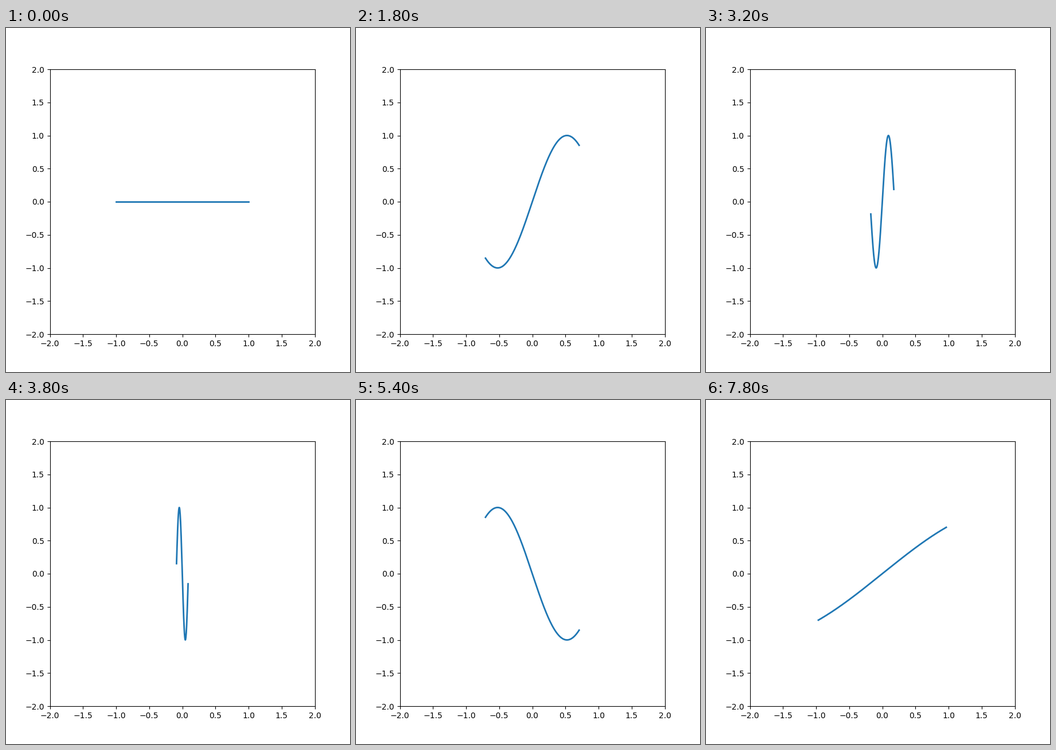
Animation, 600 px wide and 600 px high, one loop 8 s. Source, as a matplotlib script:

```python
import numpy as np
import matplotlib.pyplot as plt
from matplotlib.animation import FuncAnimation

FRAMES = 40
INTERVAL = 200            # ms
STEP = np.radians(5)      # turn per frame

s = np.linspace(-1, 1, 201)

fig, ax = plt.subplots(figsize=(6, 6), dpi=100)
ax.set_aspect("equal")
ax.set_xlim(-2, 2)
ax.set_ylim(-2, 2)
ax.set_xticks(np.arange(-2, 2.1, 0.5))
ax.set_yticks(np.arange(-2, 2.1, 0.5))
line, = ax.plot([], [], lw=2)


def update(i):
    """The parameter line shrinks as cos while its wave number swings as sin."""
    a = i * STEP
    line.set_data(s * np.cos(a), np.sin(3 * np.sin(a) * s))
    return line,


anim = FuncAnimation(fig, update, frames=FRAMES, interval=INTERVAL,
                     init_func=lambda: update(0), repeat=True, repeat_delay=0)
plt.show()
```
